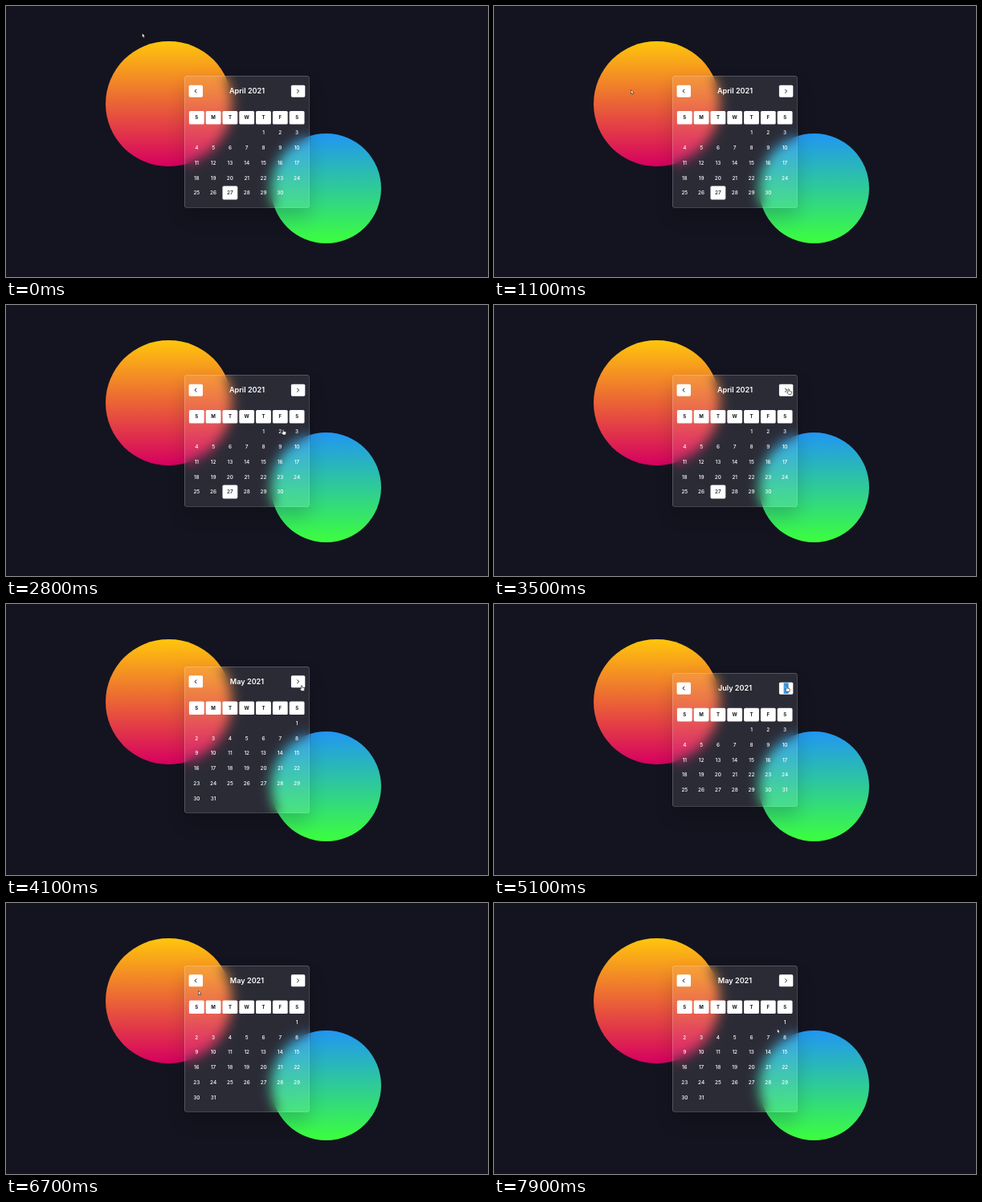
These frames come from a looping animation (600 by 338 pixels, 8000 ms). An HTML page:

```html
<!DOCTYPE html>
<html lang="en">
<head>
<meta charset="utf-8">
<title>Glass calendar</title>
<style>
html, body { margin: 0; width: 100%; height: 100%; overflow: hidden; background: #141420; }
#stage { position: relative; width: 600px; height: 338px; overflow: hidden; }
.ball { position: absolute; border-radius: 50%; }
#warm { left: 124px; top: 43.5px; width: 156.6px; height: 156.6px; background: linear-gradient(#ffc60c, #d60060); }
#cool { left: 329.5px; top: 159px; width: 137px; height: 137px; background: linear-gradient(#2196f3, #3cff3c); }
#card {
  position: absolute; left: 221.7px; width: 156.6px; box-sizing: border-box;
  border: 1px solid rgba(255,255,255,.2); border-right-color: rgba(255,255,255,.12); border-bottom-color: rgba(255,255,255,.12);
  border-radius: 3.5px; background: rgba(255,255,255,.1);
  backdrop-filter: blur(7.5px); box-shadow: 0 12px 22px rgba(0,0,0,.16);
}
svg { position: absolute; left: 0; top: 0; }
text { font: 500 6.4px Inter, sans-serif; text-anchor: middle; fill: #fff; }
.title { font-size: 9.1px; font-weight: 600; }
.head { font-size: 6px; font-weight: 700; }
.dark { fill: #17161d; }
.arrow { fill: none; stroke: #17161d; stroke-width: 1; stroke-linecap: round; stroke-linejoin: round; }
#cursor path { stroke-linejoin: round; }
</style>
</head>
<body>
<div id="stage">
  <div class="ball" id="warm"></div>
  <div class="ball" id="cool"></div>
  <div id="card"></div>
  <svg width="600" height="338">
    <g id="sheet"></g>
    <g id="cursor">
      <path id="pointer" d="M0 0V5.1L1.2 4.1L2 5.9L2.9 5.5L2.1 3.8H3.6Z" fill="#fff" stroke="#111" stroke-width=".5"/>
      <path id="hand" d="M-.7 .5Q0-.5 .7 .5V2.6L3.2 3.1Q4 3.4 3.8 4.3L3.2 7H-.2L-2.2 4.4Q-2.2 3.4-.7 4.3Z" fill="#fff" stroke="#111" stroke-width=".6"/>
    </g>
  </svg>
</div>
<script>
const LOOP = 8000, YEAR = 2021, STEP = 18.75;
const names = ['January', 'February', 'March', 'April', 'May', 'June', 'July'];
const $ = id => document.getElementById(id);

// [time, month index]
const pages = [[0, 3], [3900, 4], [4500, 5], [4900, 6], [5900, 5], [6300, 4]];
// [time, x, y] of the cursor tip
const path = [
  [0, 169.5, 34], [1100, 170.5, 104.5], [1700, 171, 105], [2700, 345, 155], [2900, 345, 155],
  [3600, 368, 101.5], [4300, 368, 101.5], [4900, 364.5, 102.5], [5300, 364.5, 102.5],
  [5800, 237, 97.5], [6400, 237, 98], [6700, 239.5, 109.5], [7900, 352.5, 157]
];

const colX = i => 237.3 + 20.8 * i;
const label = (x, y, s, cls = '') => `<text class="${cls}" x="${x}" y="${y}">${s}</text>`;
const tile = (x, y, w, h) =>
  `<rect x="${x - w / 2}" y="${y - h / 2}" width="${w}" height="${h}" rx="1.6" fill="#fff"/>`;
const chevron = (x, y, dir, color) =>
  `<path class="arrow" style="stroke:${color}" d="M${x - dir} ${y - 2}l${2 * dir} 2l${-2 * dir} 2"/>`;

function layout(month) {
  const first = new Date(YEAR, month, 1).getDay();
  const days = new Date(YEAR, month + 1, 0).getDate();
  const rows = Math.ceil((first + days) / 7);
  // a month ending on Saturday leaves an empty row, which adds only its spacing
  const height = 70.9 + STEP * rows + ((first + days) % 7 ? 0 : 2.1);
  return { first, days, height, top: 169.3 - height / 2 };
}

function drawPage(month, selected) {
  const { first, days, height, top } = layout(month);
  $('card').style.top = top + 'px';
  $('card').style.height = height + 'px';
  const by = top + 19.2;
  let out = tile(236.3, by, 17.4, 15) + tile(363.6, by, 17.4, 15) + chevron(236, by, -1, '#17161d');
  if (selected) out += `<rect x="360.6" y="${by - 6.7}" width="6" height="13.4" fill="#3297e8"/>`;
  out += chevron(363.6, by, 1, selected ? '#fff' : '#17161d');
  out += label(300, top + 22.3, `${names[month]} ${YEAR}`, 'title');
  [...'SMTWTFS'].forEach((c, i) => {
    out += tile(colX(i), top + 52.2, 18.8, 16.6) + label(colX(i), top + 54.4, c, 'head dark');
  });
  for (let d = 1; d <= days; d++) {
    const k = first + d - 1, x = colX(k % 7), y = top + 71 + STEP * Math.floor(k / 7);
    const today = month === 3 && d === 27;
    if (today) out += tile(x, y, 18.8, 16.8);
    out += label(x, y + 2.3, d, today ? 'dark' : '');
  }
  $('sheet').innerHTML = out;
}

function cursorAt(t) {
  const i = path.findIndex(p => p[0] > t);
  if (i < 0) return path[path.length - 1].slice(1);
  const [t0, x0, y0] = path[i - 1], [t1, x1, y1] = path[i];
  const u = (t - t0) / (t1 - t0), e = u * u * (3 - 2 * u);
  return [x0 + (x1 - x0) * e, y0 + (y1 - y0) * e];
}

function clickable(x, y, month) {
  const { first, days, top } = layout(month);
  const overButton = Math.abs(y - top - 19.2) < 7.5 &&
    (Math.abs(x - 236.3) < 8.7 || Math.abs(x - 363.6) < 8.7);
  const col = Math.round((x - 237.3) / 20.8), row = Math.round((y - top - 71) / STEP);
  const day = row * 7 + col - first + 1;
  const overDay = col >= 0 && col < 7 && row >= 0 && day > 0 && day <= days &&
    Math.abs(x - colX(col)) < 9.4 && Math.abs(y - top - 71 - STEP * row) < 8.3;
  return overButton || overDay;
}

let shown = '';
function render(now) {
  const t = Math.floor(now % LOOP / 100) * 100;
  const month = pages.filter(p => p[0] <= t).pop()[1];
  const selected = t >= 4900 && t < 5900;
  const key = month + '/' + selected;
  if (key !== shown) drawPage(month, selected);
  shown = key;
  const [x, y] = cursorAt(t), over = clickable(x, y, month);
  $('cursor').setAttribute('transform', `translate(${x} ${y})`);
  $('hand').style.display = over ? '' : 'none';
  $('pointer').style.display = over ? 'none' : '';
}

const start = performance.now();
function tick() {
  render(performance.now() - start);
  requestAnimationFrame(tick);
}
tick();
</script>
</body>
</html>
```
